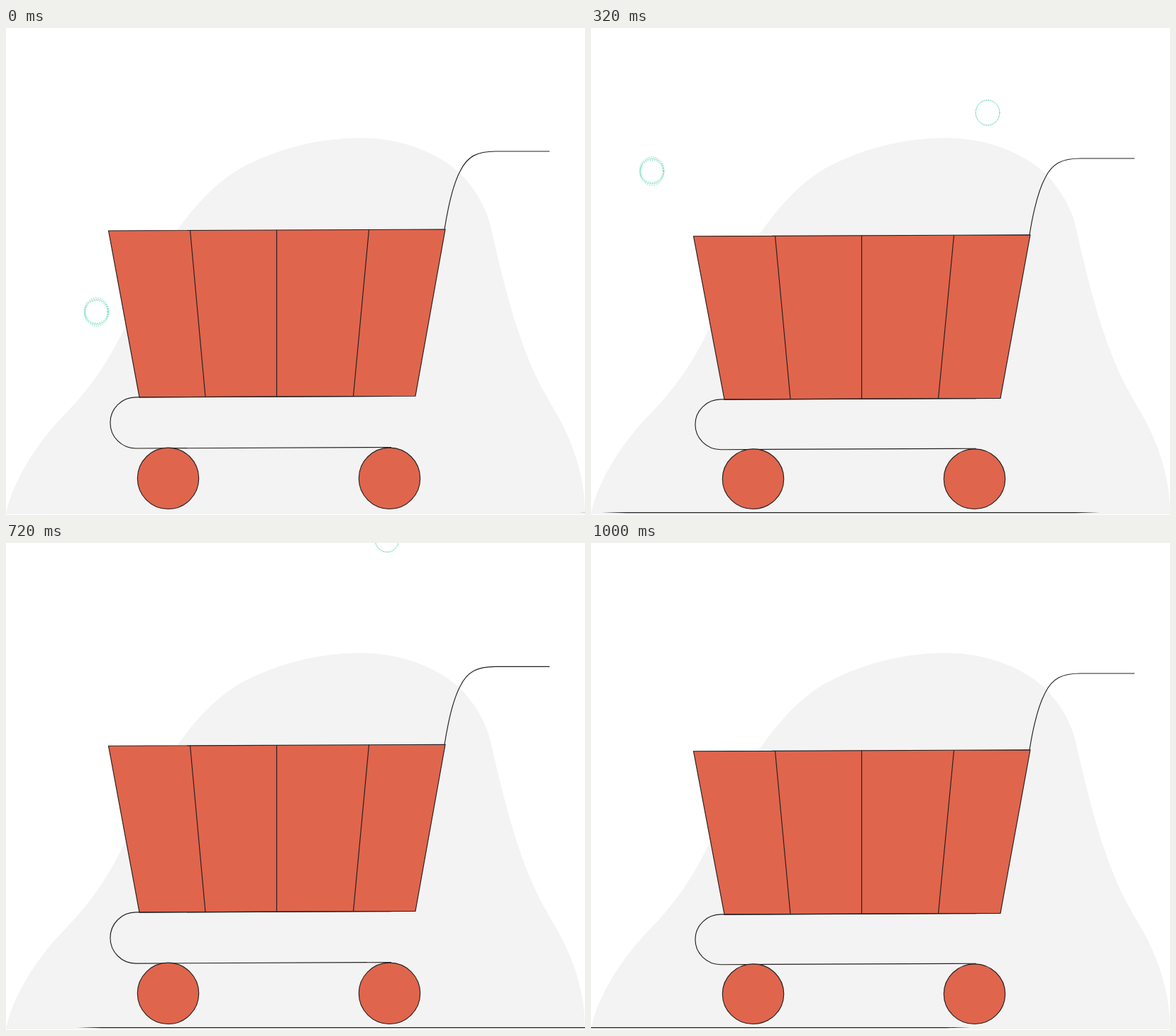
Animation, 816 px wide and 687 px high, one loop 1040 ms. Source, as an HTML page:

```html
<!DOCTYPE html>
<html lang="en">
<head>
<meta charset="utf-8">
<title>Rolling cart</title>
<style>
  html, body { margin: 0; width: 100%; height: 100%; overflow: hidden; background: #fff; }
  svg { display: block; width: 816px; height: 687px; }
  .ring { fill: none; stroke: #4fd3ab; stroke-width: 1; stroke-dasharray: 1.2 2; }
  .ring .solid { stroke-dasharray: none; stroke-opacity: .45; }
  #cart { stroke: #24201f; stroke-width: 1.15; fill: none; }
  #cart * { vector-effect: non-scaling-stroke; }
  #cart .red { fill: #e0654d; }
</style>
</head>
<body>
<svg viewBox="0 0 816 687">
  <g id="ringA" class="ring">
    <ellipse class="solid" rx="16.7" ry="17.5"/>
    <ellipse rx="17.3" ry="20.2"/>
    <ellipse rx="16.4" ry="18"/>
    <ellipse rx="15.5" ry="15.8"/>
  </g>
  <g id="ringB" class="ring">
    <ellipse class="solid" rx="16.8" ry="17.4"/>
    <ellipse rx="17" ry="18.2"/>
  </g>
  <path fill="#f3f3f3" d="M0 686C8 640 46 583 80 548C112 515 141 479 168 421
    C190 370 207 335 238 290C262 256 290 222 330 198C380 171 440 155 500 155
    C556 155 608 175 640 205C664 230 679 257 685 289C703 368 720 432 745 487
    C757 514 773 537 785 561C804 600 816 640 816 686Z"/>
  <g id="cart">
    <path d="M618 284C624 246 631 219 640 202C650 181 664 174 690 174H766"/>
    <path class="red" d="M144.5 286L619 284L577 519.2L188 521Z"/>
    <path d="M259.5 285.5L281 520.5M381.5 285V520M511.5 284.5L489.5 519.5"/>
    <path d="M543 519.5L183 520.8A36 36 0 0 0 183 593L543 591.5"/>
    <circle class="red" cx="228.5" cy="635.3" r="43.2"/>
    <circle class="red" cx="540.5" cy="635.3" r="43.2"/>
  </g>
  <path id="streakA" fill="#222"/>
  <path id="streakB" fill="#222"/>
</svg>
<script>
const LOOP = 1040, STEP = 40, BOUNCE = 340, GROUND = 679;
const el = id => document.getElementById(id);

// Linear interpolation through [time, value] pairs, extended past both ends.
function along(keys, t) {
  let i = 1;
  while (i < keys.length - 1 && t > keys[i][0]) i++;
  const [t0, v0] = keys[i - 1], [t1, v1] = keys[i];
  return v0 + (v1 - v0) * (t - t0) / (t1 - t0);
}

const rings = [
  { node: el('ringA'), x: [[0, 127.5], [200, 111.8], [320, 85.8], [560, 26.5]],
    y: [[0, 400.5], [200, 291], [320, 202], [560, 37.5]] },
  { node: el('ringB'), x: [[0, 559], [320, 559], [560, 546.5], [720, 537]],
    y: [[0, 205], [200, 154.5], [320, 119.5], [560, 48.5], [720, -5]] }
];

const streaks = [
  { node: el('streakA'), left: [[0, 808], [200, 350], [320, 15]], right: [[320, 717], [560, 130]] },
  { node: el('streakB'), left: [[560, 522], [720, 100]], right: [[840, 930], [1000, 535]] }
];

// Thin ground line with pointed ends.
function streakPath(left, right) {
  const taper = 35, y = 683.6, h = 0.65;
  return `M${left} ${y}L${left + taper} ${y - h}H${right - taper}L${right} ${y}` +
    `L${right - taper} ${y + h}H${left + taper}Z`;
}

function draw(t) {
  const squash = 1 - 0.01 * (1 - Math.cos(Math.PI * t / BOUNCE));
  el('cart').setAttribute('transform', `matrix(1 0 0 ${squash} 0 ${GROUND * (1 - squash)})`);
  for (const r of rings)
    r.node.setAttribute('transform', `translate(${along(r.x, t)} ${along(r.y, t)})`);
  for (const s of streaks)
    s.node.setAttribute('d', streakPath(along(s.left, t), along(s.right, t)));
}

const start = performance.now();
function tick() {
  const t = (performance.now() - start) % LOOP;
  draw(Math.floor(t / STEP) * STEP);
  requestAnimationFrame(tick);
}
tick();
</script>
</body>
</html>
```
